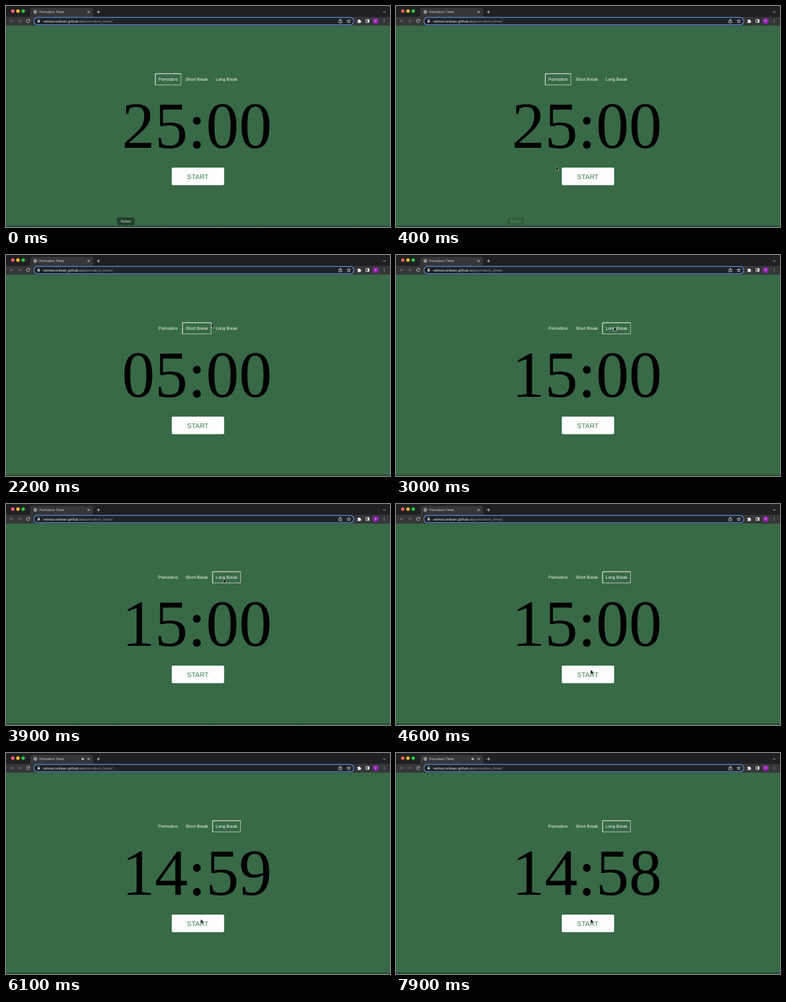
These frames come from a looping animation (600x346 px, 8 s). An HTML page:

```html
<!DOCTYPE html>
<html lang="en">
<head>
<meta charset="utf-8">
<title>Pomodoro Timer</title>
<style>
  html, body { margin: 0; width: 100%; height: 100%; overflow: hidden; background: #386a47; }
  svg { display: block; width: 600px; height: 346px; text-rendering: geometricPrecision; }
  .ui { font-family: Inter, Roboto, sans-serif; }
  .page { font-family: "Liberation Sans", Arial, sans-serif; }
  .icon { fill: none; stroke: #dfe1e5; stroke-width: .8; }
  #time { font: 103px "Liberation Serif", "Times New Roman", serif; }
</style>
</head>
<body>
<svg viewBox="0 0 600 346">
  <defs>
    <linearGradient id="edge" x2="0" y2="1">
      <stop stop-color="#1c3524" stop-opacity="0"/>
      <stop offset="1" stop-color="#1c3524" stop-opacity=".85"/>
    </linearGradient>
  </defs>
  <rect width="600" height="346" fill="#386a47"/>
  <rect y="342.5" width="600" height="3.5" fill="url(#edge)"/>

  <!-- Browser window -->
  <g class="ui">
    <rect width="600" height="30.7" fill="#35363a"/>
    <path d="M0 0H600V17H139Q136 17 136 14V6Q136 3 133 3H41Q38 3 38 6V14Q38 17 35 17H0Z" fill="#1f2023"/>
    <circle cx="10.6" cy="8" r="2.7" fill="#fe5f57"/>
    <circle cx="18.7" cy="8" r="2.7" fill="#febc2e"/>
    <circle cx="26.9" cy="8" r="2.7" fill="#28c840"/>
    <g class="icon">
      <circle cx="45.8" cy="9.2" r="2.3"/>
      <path d="M43.7 8.5L46 9.4L45.4 11.3M46.4 7.1L47.8 9"/>
      <path d="M127.3 7.6l3.4 3.4m0-3.4l-3.4 3.4M142 9.3h5m-2.5-2.5v5M589.2 8.4l1.9 1.9l1.9-1.9"/>
      <path d="M11.7 23.5H6.5m2.4-2.4l-2.4 2.4l2.4 2.4M18.6 23.5h5.2m-2.4-2.4l2.4 2.4l-2.4 2.4" stroke="#77797d"/>
      <path d="M36.5 22A2.5 2.5 0 1 0 36.9 24.3M37 20.7v1.8h-1.8"/>
    </g>
    <g id="audio" fill="#e8eaed">
      <path d="M118 8.5h1l1.4-1.2v4.2l-1.4-1.2h-1z"/>
      <path d="M121.2 8.2q1 1.2 0 2.4" class="icon" stroke-width=".6"/>
    </g>
    <text x="52.2" y="11.2" font-size="4.92" fill="#e8eaed">Pomodoro Timer</text>

    <rect x="43.6" y="17.8" width="499.6" height="11.6" rx="5.8" fill="#202124" stroke="#5c8bd6" stroke-width="1.2"/>
    <rect x="49.4" y="23" width="3.4" height="2.7" rx=".4" fill="#c4c7cb"/>
    <path d="M50.1 23v-.9a1 1 0 0 1 2 0v.9" class="icon" stroke-width=".6"/>
    <text x="57.8" y="25.6" font-size="5.6" fill="#e8eaed">velmacordean.github.io<tspan fill="#9aa0a6">/pomodoro_timer/</tspan></text>
    <g class="icon" stroke-width=".7">
      <path d="M521.3 22.6h-1.2v3.6h4.6v-3.6h-1.2M522.4 24.5v-4m-1.3 1.3l1.3-1.3l1.3 1.3"/>
      <path d="M535.6 20.9l.8 1.8l2 .2l-1.5 1.3l.4 1.9l-1.7-1l-1.7 1l.4-1.9l-1.5-1.3l2-.2z"/>
      <rect x="562.4" y="21.2" width="4.8" height="4.6"/>
    </g>
    <path d="M565 21h2.4v5H565zM549.2 22h1.4a1 1 0 0 1 2 0h1.4v1.4a1 1 0 0 1 0 2v1.2h-4.8v-1.3a.9.9 0 0 0 0-1.8z" fill="#f1f3f4"/>
    <circle cx="577.6" cy="23.6" r="4.7" fill="#8e24aa"/>
    <text x="577.6" y="25.4" font-size="5" fill="#fff" text-anchor="middle">V</text>
    <path d="M591 21.5v.01M591 23.5v.01M591 25.5v.01" stroke="#e8eaed" stroke-width="1.1" stroke-linecap="round"/>
  </g>

  <!-- Timer page -->
  <g class="page" font-size="6.58" fill="#fff">
    <text x="238" y="116.9">Pomodoro</text>
    <text x="280.7" y="116.9">Short Break</text>
    <text x="327.8" y="116.9">Long Break</text>
  </g>
  <g fill="none" stroke-width="1">
    <path id="shade" stroke="#b4c2b8"/>
    <path id="light" stroke="#fff"/>
  </g>
  <text id="time" x="181" y="222.3"></text>
  <rect x="259" y="253" width="81.8" height="27.5" rx="2" fill="#fefefe"/>
  <text class="page" x="299.7" y="270.6" font-size="10.6" fill="#38804a" text-anchor="middle">START</text>

  <g id="tooltip" class="ui">
    <path d="M175.5 331H198.7Q201 331 201 333.3V340.6Q201 342.9 198.7 342.9H190.5L187 346L183.5 342.9H175.5Q173.2 342.9 173.2 340.6V333.3Q173.2 331 175.5 331Z" fill="#23402c"/>
    <text x="187.1" y="338.9" font-size="5.7" fill="#e3e8e4" text-anchor="middle">Notes</text>
  </g>
  <path id="cursor" d="M0 0V7L1.6 5.6L2.7 8L3.9 7.5L2.8 5.1H5Z" fill="#000" stroke="#e8ece9" stroke-width=".5"/>
</svg>
<script>
const LOOP = 8000;
const $ = id => document.getElementById(id);
const clamp = v => Math.max(0, Math.min(1, v));

// Left and right edge of each mode's outline
const tabs = [[233.3, 273.3], [275.8, 320.5], [322.8, 366.4]];

// Time, selected tab, display
const states = [
  [0, 0, "25:00"], [1600, 1, "05:00"], [3000, 2, "15:00"],
  [6000, 2, "14:59"], [7000, 2, "14:58"]
];

// Pointer stops: time, x, y
const stops = [
  [0, 187, 352], [200, 187, 352], [500, 272, 215], [700, 272, 215],
  [1300, 292.5, 116], [1700, 293, 115], [2200, 321, 107], [2600, 340.5, 112.5],
  [3800, 340.5, 112.5], [3900, 340, 117], [4600, 304.2, 259.3], [4800, 304.2, 260], [LOOP, 304.2, 260]
];

function pointerAt(t) {
  const i = stops.findIndex(s => s[0] > t);
  const [t0, x0, y0] = stops[i - 1], [t1, x1, y1] = stops[i];
  const u = (t - t0) / (t1 - t0), k = u * u * (3 - 2 * u);
  return [x0 + (x1 - x0) * k, y0 + (y1 - y0) * k];
}

function draw(now) {
  const t = Math.floor(now % LOOP / 100) * 100;
  const [, tab, label] = states.findLast(s => s[0] <= t);
  const [left, right] = tabs[tab];
  $("time").textContent = label;
  $("light").setAttribute("d", `M${left} 124V106H${right}`);
  $("shade").setAttribute("d", `M${left} 123.6H${right}V106`);
  $("cursor").setAttribute("transform", `translate(${pointerAt(t)})`);
  $("tooltip").setAttribute("opacity", clamp((500 - t) / 400));
  $("audio").setAttribute("opacity", clamp((t - 5400) / 300));
  requestAnimationFrame(draw);
}
requestAnimationFrame(draw);
</script>
</body>
</html>
```
